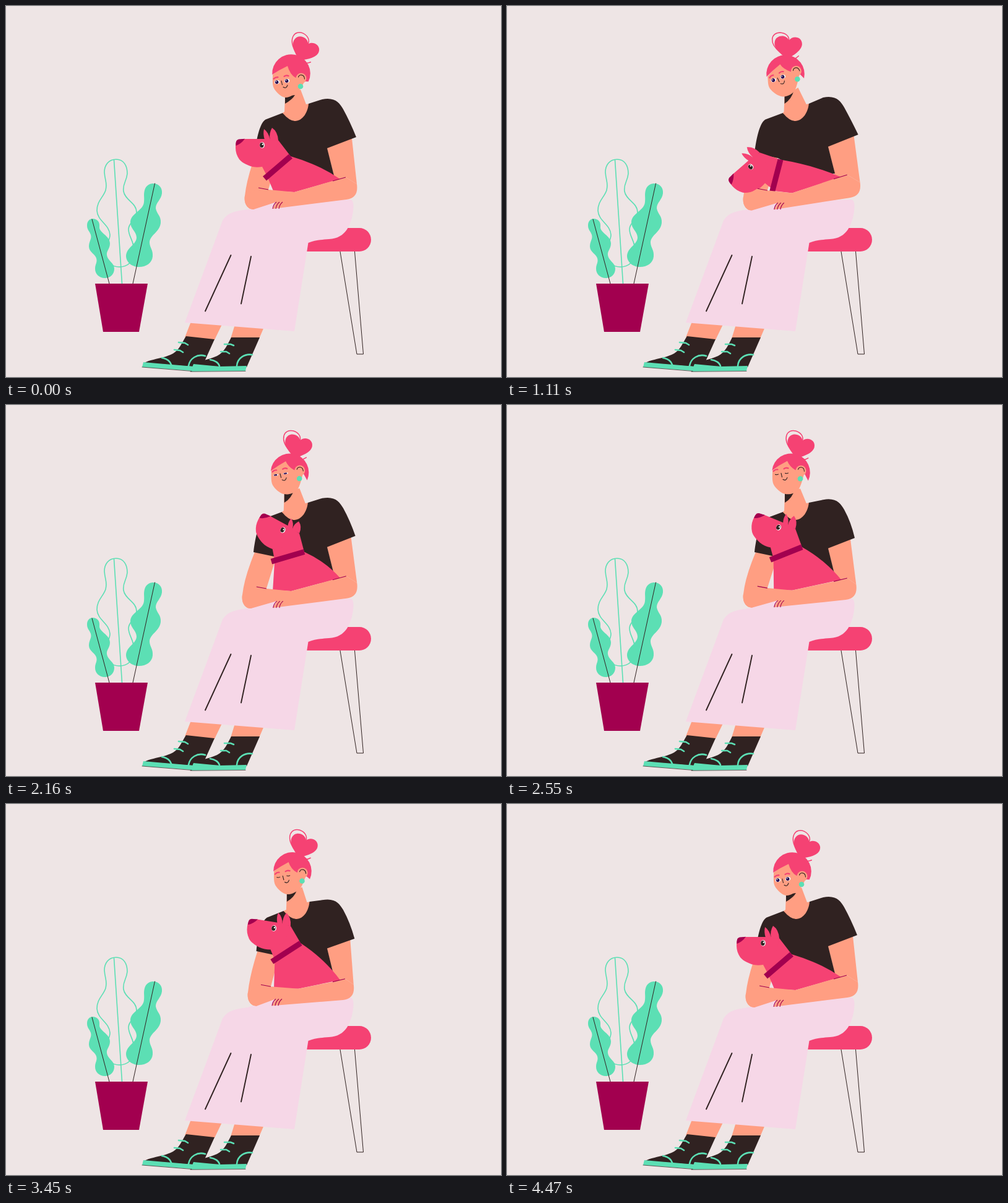
Recreate the animation shown at these times as an HTML page. Size 800x600 px, loop 4.5 s.

```html
<!DOCTYPE html>
<html lang="en">
<head>
<meta charset="utf-8">
<title>Woman with a dog</title>
<style>
  html, body { margin: 0; width: 100%; height: 100%; overflow: hidden; background: #eee5e5; }
  svg { display: block; width: 100vw; height: 100vh; }
  .pink { fill: #f54273; }
  .skin { fill: #ff9e82; }
  .dark { fill: #302221; }
  .wine { fill: #a2004f; }
  .mint { fill: #5cdfb4; }
  .line { fill: none; stroke: #302221; stroke-linecap: round; }
  .mintLine { fill: none; stroke: #5cdfb4; stroke-linecap: round; }
  .pinkLine { fill: none; stroke: #f54273; stroke-linecap: round; }
  .wineLine { fill: none; stroke: #a2004f; }
</style>
</head>
<body>
<svg viewBox="0 0 800 600" xmlns="http://www.w3.org/2000/svg">
  <rect width="800" height="600" fill="#eee5e5"/>

  <g id="plant">
    <path class="mintLine" stroke-width="1.6" d="M178 248C166 248 159 257 159 269C160 283 164 286 161 298C157 310 147 315 147 331C148 348 167 353 168 370C168 380 160 388 160 401C161 415 172 422 183 422C197 422 207 412 207 400C208 380 198 374 198 361C198 350 211 346 211 334C211 318 193 315 190 300C188 287 195 284 196 271C196 258 190 248 178 248ZM174.500 249L187.500 449"/>
    <path class="mint" d="M238 287C247 287 253 294 252 303C251 313 242 318 242 327C243 336 251 339 250 351C248 366 233 370 232 382C232 391 238 394 237 405C236 416 226 422 215 422C203 422 194 414 194 404C195 390 211 386 211 374C210 363 201 361 201 349C202 335 222 331 223 317C224 309 222 306 224 298C226 291 231 287 238 287Z"/>
    <path class="mint" d="M140 344C147 344 152 349 151 357C150 367 168 371 168 384C168 393 162 396 163 403C164 412 175 415 175 425C175 434 168 440 160 440C150 440 144 433 144 425C144 417 148 415 146 408C144 401 134 398 134 389C134 380 139 377 137 370C135 364 131 362 131 355C131 348 135 344 140 344Z"/>
    <path class="line" stroke-width="1" d="M240.500 287L205 449M139 345L167 449"/>
    <path class="wine" d="M144 449H229L215 527H157Z"/>
  </g>

  <g id="stool">
    <path class="line" stroke-width="1" d="M540 397L567 563H577.500L563.500 397"/>
    <path class="pink" d="M470 359H571A19 19 0 0 1 571 397H470Z"/>
  </g>

  <g id="legs">
    <path class="skin" d="M300 508L350 513L337 540L289 536ZM371 512L418 517L409 538L363 538Z"/>
    <path class="dark" d="M291 534L337 539L323 570L317 584L222 578C236 570 253 571 270 562C280 556 284 545 291 534Z"/>
    <path class="mint" d="M222 576L303 583L300 590L220 584Z"/>
    <path class="mintLine" stroke-width="2.600" d="M279 544L289 545L294 548M272 556L281 557L286 560M252 569Q264 571 267 580M295 582C297 570 309 562 322 566"/>
    <path class="dark" d="M364 536H410L389 584L302 582C311 573 326 573 341 566C354 559 358 547 364 536Z"/>
    <path class="mint" d="M303 579L345 583L389 582L387 590L298 591Z"/>
    <path class="mintLine" stroke-width="2.600" d="M353 547L363 547L368 549M347 559L356 559L361 562M330 572Q342 574 345 582M373 582C374 569 386 562 398 564"/>
    <path class="line" stroke-width=".7" d="M220 584L300 590.500M298 591.300L387 590.500"/>
  </g>

  <path fill="#f6d7e7" d="M350 347C357 336 366 332 390 329L435 316L557 313C562 315 562 322 561 332C558 352 550 376 522 377C508 378 498 379 488.500 383L466 526L289 512Z"/>
  <path class="line" stroke-width="1.900" d="M363.500 403L322 493.500M396 405L380 481.500"/>

  <path class="skin" id="upperArms"/>
  <path class="dark" id="shirt"/>
  <path class="skin" id="neck"/>
  <path class="dark" id="shadow"/>

  <g id="bun"><g transform="translate(13 -22) rotate(27)">
    <path class="pink" d="M0 2C-5 -4 -23 -12 -22 -25C-21 -38 -3 -39 1 -29C6 -38 22 -37 22.500 -24C22 -12 6 -4 0 2Z"/>
    <path class="pinkLine" stroke-width="1.500" d="M-12 -9C-32 -23 -29 -40 -14 -41C-5 -41 1 -36 1 -29M-2 0C6 4 14 0 18 -5"/>
  </g></g>
  <path class="skin" id="face"/>
  <path class="pink" id="hair"/>
  <g id="ear">
    <circle class="skin" r="8.500"/>
    <path class="line" stroke-width="1.100" d="M-4.500 -2C-3 -7 5 -7 5.500 1"/>
  </g>
  <circle class="mint" id="earring" r="4.300"/>
  <g id="eyeL"></g>
  <g id="eyeR"></g>
  <path class="pinkLine" id="browL" stroke-width="2.200" d="M-3.500 1.500Q0 -1.500 3.500 -.5"/>
  <path class="pinkLine" id="browR" stroke-width="2.200" d="M-3.500 .5Q0 -1.500 3.500 .5"/>
  <path class="line" id="nose" stroke-width="1.100" d="M0 0L1.500 6.500"/>
  <path class="line" id="mouth" stroke-width="1.100" d="M-4 1Q1 4.500 3 -2"/>

  <path class="pink" id="dogBody"/>
  <g id="dogHead">
    <path class="pink" d="M-41 -8L-29 -10H4L26 -8L20 20L0 35C-7 36 -13 36 -19 34C-27 31 -33 28 -37 23C-41 17 -43 11 -43 4Q-43 -4 -41 -8Z"/>
    <path class="wine" d="M-42.500 1Q-43.500 -8 -38 -9.500L-28 -10.200Q-34 -2 -42.500 1Z"/>
    <g transform="translate(0 -9)"><path class="pink" id="ears" d="M4 2V0Q1 -9 3 -17Q11 -11 12.500 0Q11 -11 16 -19Q25 -13 26 1Z"/></g>
    <ellipse rx="4" ry="4.800" fill="#fff"/>
    <ellipse cx="-.6" rx="3.200" ry="4" class="dark"/>
    <circle cx=".8" cy="-1.200" r="1.200" fill="#fff"/>
  </g>
  <path class="wineLine" id="collar" stroke-width="9"/>

  <path class="skin" id="forearms"/>
  <path class="wineLine" id="creases" stroke-width="1.100"/>
</svg>

<script>
const LOOP = 4500;

// x: head position, roll and pitch: head, sway and lift: upper body,
// eyes: openness, dogX, dogY and turn: dog's head around its eye
const rest = { t: 0, x: 461, roll: 0, pitch: 0, sway: 0, lift: 0, eyes: 1, dogX: 414, dogY: 225, turn: 0 };
const poses = [
  rest,
  { ...rest, t: 1110, x: 450, roll: -13, pitch: -9, sway: -4, lift: -4, dogX: 394, dogY: 260, turn: -41 },
  { ...rest, t: 1740, x: 458, roll: -4, pitch: -10.5, sway: -4, lift: -4, dogX: 457, dogY: 207, turn: 36 },
  { ...rest, t: 2550, x: 459, pitch: -11, sway: -4, lift: 3, eyes: 0, dogX: 439, dogY: 198, turn: 22 },
  { ...rest, t: 3060, x: 455, roll: -9, pitch: -7.5, sway: 3, lift: 5, eyes: 0, dogX: 433, dogY: 201, turn: 9 },
  { ...rest, t: 3960, x: 475, roll: 10, pitch: -1, sway: 8, lift: 7, eyes: 0, dogX: 433, dogY: 201, turn: 9 },
  { ...rest, t: 4470 },
  { ...rest, t: LOOP }
];

const $ = id => document.getElementById(id);
const mix = (a, b, k) => a + (b - a) * k;
const between = (p, q, k) => [mix(p[0], q[0], k), mix(p[1], q[1], k)];
const add = (p, x, y) => [p[0] + x, p[1] + y];
const str = p => p[0].toFixed(2) + ' ' + p[1].toFixed(2);
const path = (id, ...parts) =>
  $(id).setAttribute('d', parts.map(p => typeof p === 'string' ? p : str(p)).join(' '));
const place = (id, p, turn = 0) =>
  $(id).setAttribute('transform', `translate(${str(p)}) rotate(${turn.toFixed(2)})`);

function rotate([x, y], deg) {
  const a = deg * Math.PI / 180, c = Math.cos(a), s = Math.sin(a);
  return [x * c - y * s, x * s + y * c];
}

// Smooth curve through points, continuing from the first one.
function spline(pts) {
  let d = '';
  for (let i = 0; i < pts.length - 1; i++) {
    const a = pts[i - 1] || pts[i], b = pts[i], c = pts[i + 1], e = pts[i + 2] || c;
    d += 'C' + [
      add(b, (c[0] - a[0]) / 6, (c[1] - a[1]) / 6),
      add(c, (b[0] - e[0]) / 6, (b[1] - e[1]) / 6),
      c
    ].map(str).join(' ');
  }
  return d;
}

for (const id of ['eyeL', 'eyeR']) {
  $(id).innerHTML =
    '<g><ellipse rx="4.300" ry="3.200" fill="#fff"/>' +
    '<circle cx="-.4" r="2.900" fill="#2a0b52"/><circle cx="-1.300" cy="-1" r=".8" fill="#fff"/></g>' +
    '<path class="line" stroke-width="1" d="M-2.500 -.3Q0 1 2.500 0"/>';
}

// Body point: each follows sway sideways and lift up or down by its own share.
const bodyRig = s => (x, y, sway = 0, lift = 0, out = 0) =>
  [x + sway * s.sway + out * s.lift, y + lift * s.lift];

// Head point relative to the skull centre: rolls, and slides with pitch.
function headRig(s) {
  const skull = [s.x, 109 - (s.x - 461) / 10];
  return (x, y, pitch = 1, roll = 1) =>
    add(skull, ...add(rotate([x, y], s.roll * roll), 0, s.pitch * pitch));
}

function drawBody(at) {
  const sleeve = at(402, 238, .5), shoulder = at(421, 183, .5), top = at(519, 150, 0, .75);
  const tip = at(566, 212, .4, 1, -.8), pit = at(519, 230, 0, .6);
  const elbowL = at(386, 329, 1, -.4), creaseL = at(408, 294, .8, -.3), wristL = add(creaseL, 16, 3);
  const creaseR = at(528, 283, 0, .8), endR = at(549, 277, -.2, 1);
  const elbowR = at(568, 313, 0, .7, -.9), outerR = add(elbowR, -1, -25);
  const hand = at(437, 317, -.2, -.3);
  const bendL = ['C', add(elbowL, 4, 0), add(elbowL, -2, -10), add(elbowL, 0, -22)];

  path('upperArms', 'M', add(sleeve, 2, 0), 'L', add(sleeve, 37, 7), 'L', wristL,
    'L', add(elbowL, 14, 0), ...bendL, 'Q', add(elbowL, 3, -50), add(sleeve, 2, 0), 'Z',
    'M', add(pit, -1, -3), 'L', add(tip, -7, 2), 'L', outerR, 'L', endR, 'L', creaseR,
    'L', add(creaseR, 1, -12), 'Z');

  path('shirt', 'M', sleeve, 'C', add(sleeve, 3, -25), add(shoulder, -10, 3), shoulder,
    'L', at(447, 173, .3), 'L', at(467, 186, .4), 'L', at(489, 158, .3), 'L', add(top, -8, 1),
    'C', add(top, 13, -3), add(top, 20, 7), add(top, 26, 17),
    'Q', add(top, 37, 37), tip, 'L', pit, 'L', add(creaseR, 2, -9),
    'L 450 285 L 445 250 L', add(sleeve, 38, 8), 'Z');

  path('forearms', 'M', creaseL, 'L', wristL, 'L', at(466, 301, 1.3, -.4), 'L', creaseR,
    'L', endR, 'L', outerR,
    'C', add(elbowR, 1, -10), add(elbowR, -4, -2), add(elbowR, -18, 0),
    'L', add(hand, -6, 11), 'L', hand, 'L', add(elbowL, 14, 0), ...bendL, 'Z');

  const fingers = [0, 5, 10].flatMap(x =>
    ['M', add(hand, x, 0), 'Q', add(hand, x - 5, 4), add(hand, x - 6, 11)]);
  path('creases', 'M', creaseL, 'L', wristL, 'M', creaseR, 'L', endR, ...fingers);
}

function drawHead(s, at, on) {
  const skull = on(0, 0, 0), R = 30.8;
  const rim = p => {
    const a = Math.atan2(p[1] - skull[1], p[0] - skull[0]);
    return add(skull, R * Math.cos(a), R * Math.sin(a));
  };
  const neckL = at(447, 173, .3), neckB = at(467, 186, .4), neckR = at(489, 158, .3);
  const nape = on(-10, 37, .35), ear = on(16, 8), temple = on(7, 7);
  const hairL = on(-30, 2, .5), part = on(-6, -12, .6);

  path('neck', 'M', nape, 'L', [nape[0] - 1, neckL[1] - 2], 'L', neckL,
    'Q', add(neckB, -9, 0), neckB, 'C', add(neckB, 13, 0), add(neckR, -1, 13), neckR,
    'L', add(neckR, -4, 1), 'L', on(15, 26, 0), 'Z');
  const shade = on(6, 35, .7);
  path('shadow', 'M', nape, 'L', shade, 'Q', [shade[0] - 4, 151], [nape[0], 158], 'Z');

  const jaw = [on(-28, 24, .4, .5), on(-10, 39, .4, .5), on(11, 29, 0, .5)];
  path('face', 'M', hairL, spline([hairL, ...jaw, add(ear, 5, 6)]),
    'L', temple, 'L', add(part, 0, -4), 'Z');
  path('hair', 'M', rim(hairL), `A ${R} ${R} 0 1 1`, rim(on(27, 13, 0)), 'L', add(ear, 6, 5),
    'L', temple, 'Q', [part[0] + 4, temple[1] - 5], part,
    'Q', add(between(hairL, part, .5), -1, -1), rim(hairL), 'Z');

  place('ear', ear, s.roll);
  place('earring', on(15, 21));
  place('bun', skull, 1.2 * s.roll + .9 * s.pitch);
  place('eyeL', on(-23, 14), s.roll - 6);
  place('eyeR', on(-7, 12), s.roll - 6);
  place('browL', on(-25, 7), s.roll - 6);
  place('browR', on(-8, 4), s.roll - 6);
  place('nose', on(-16, 12), s.roll);
  place('mouth', on(-9, 21), s.roll);

  const open = Math.min(1, Math.max(0, (s.eyes - .5) * 3 + .5));
  for (const id of ['eyeL', 'eyeR']) {
    const [lid, shut] = $(id).children;
    lid.setAttribute('transform', `scale(1 ${Math.max(open, .01)})`);
    lid.setAttribute('opacity', open > .03 ? 1 : 0);
    shut.setAttribute('opacity', open > .3 ? 0 : 1);
  }
}

function drawDog(s, at) {
  const eye = [s.dogX, s.dogY];
  const onHead = (x, y) => add(eye, ...rotate([x, y], s.turn));
  const onNeck = (x, y) => add(eye, ...rotate([x, y], .85 * s.turn));
  const low = onNeck(4, 54), up = onNeck(46, 18), chest = between(low, up, .1);
  const tail = at(540, 280, 0, .8);

  path('dogBody', 'M', onHead(0, 35), 'L', chest, 'L', at(432, 299, .2),
    'L', at(466, 301, 1.3, -.4), 'L', tail,
    'Q', add(between(up, tail, .5), 6, -5), up, 'L', onHead(26, -8), 'Z');
  path('collar', 'M', low, 'L', up);
  place('dogHead', eye, s.turn);

  // Ears flatten as the head tips back.
  const flat = Math.max(0, s.turn / 36) ** 4;
  $('ears').setAttribute('transform', `scale(1 ${(1 - .45 * flat).toFixed(3)})`);
}

function draw(now) {
  const t = now % LOOP;
  const i = poses.findIndex(p => p.t > t) - 1;
  const a = poses[i], b = poses[i + 1];
  const k = (1 - Math.cos(Math.PI * (t - a.t) / (b.t - a.t))) / 2;
  const s = {};
  for (const name in rest) s[name] = mix(a[name], b[name], k);

  const at = bodyRig(s);
  drawBody(at);
  drawHead(s, at, headRig(s));
  drawDog(s, at);
}

const start = performance.now();
function tick() {
  draw(performance.now() - start);
  requestAnimationFrame(tick);
}
tick();
</script>
</body>
</html>
```
